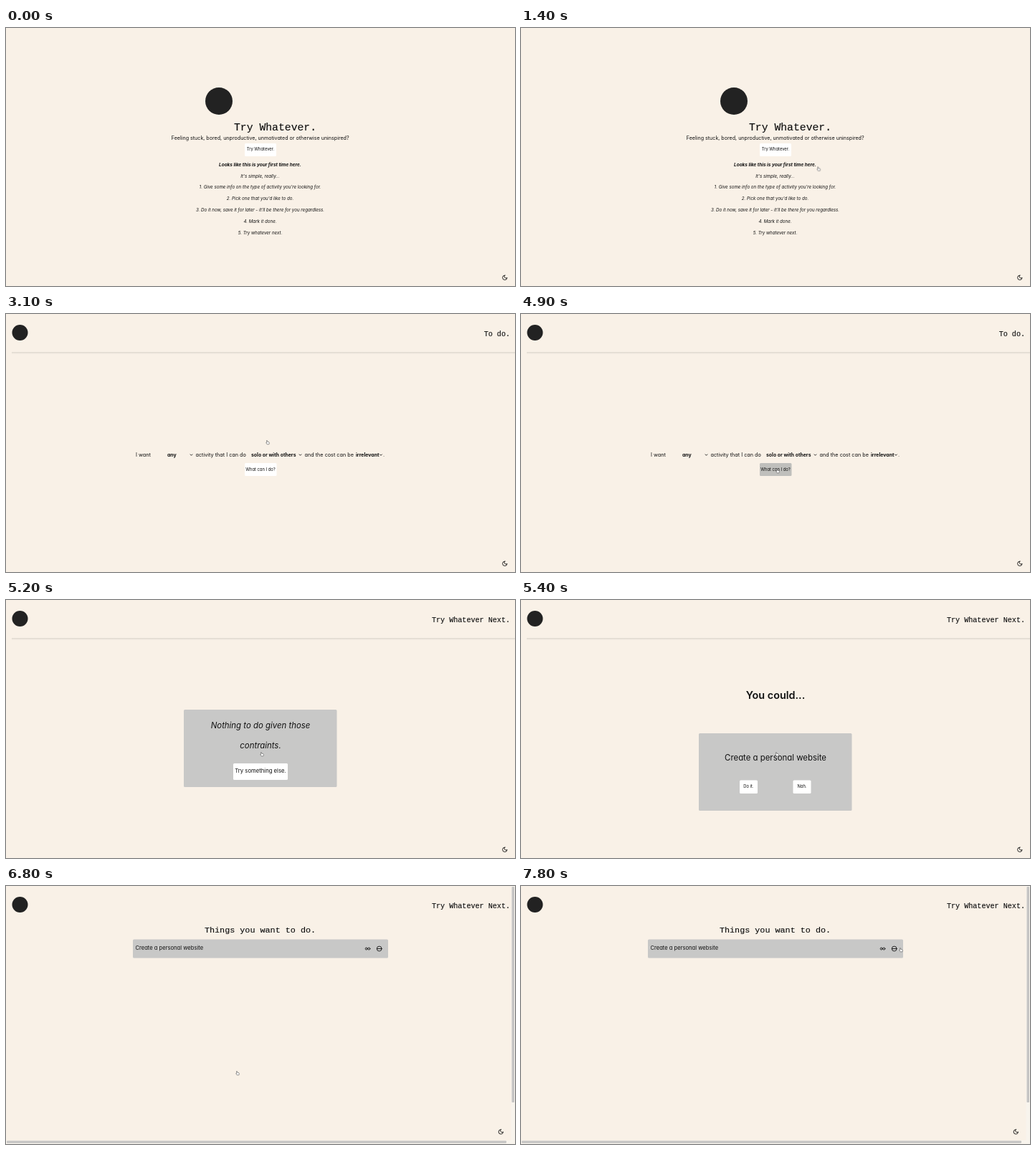
Animation, 710 px wide and 360 px high, one loop 8 s. Source, as an HTML page:

```html
<!DOCTYPE html>
<html lang="en">
<head>
<meta charset="utf-8">
<title>Try Whatever.</title>
<style>
  html, body { margin: 0; width: 100%; height: 100%; overflow: hidden; background: #f9f1e7; }
  svg { display: block; width: 710px; height: 360px; }
  text { font: 7.25px Inter, sans-serif; font-feature-settings: "cv11"; fill: #111; }
  .mid { text-anchor: middle; }
  .end { text-anchor: end; }
  .mono { font-family: "Liberation Mono", monospace; font-size: 10.1px; stroke: #111; stroke-width: .15; }
  .pick { font-size: 6.9px; font-weight: 700; }
  .guide text { font-size: 6.2px; font-style: italic; }
  .guide text:first-child { font-size: 6.45px; font-weight: 700; }
  .small { font-size: 5.8px; }
  .card-text { font-size: 11.4px; }
  .slanted { font-style: italic; }
  .bg { fill: #f9f1e7; }
  .card { fill: #c8c8c7; }
  .button { fill: #fff; }
  .icon { fill: none; stroke: #111; stroke-width: .9; stroke-linecap: round; stroke-linejoin: round; }

  /* Later pages are opaque and cover the earlier ones. */
  .page { animation: 8s step-end infinite; }
  .choose { animation-name: choose; }
  .empty { animation-name: empty; }
  .idea { animation-name: idea; }
  .list { animation-name: list; }
  @keyframes choose { 0% { visibility: hidden } 38.75%, 100% { visibility: visible } }
  @keyframes empty { 0% { visibility: hidden } 65%, 100% { visibility: visible } }
  @keyframes idea { 0% { visibility: hidden } 67.5%, 100% { visibility: visible } }
  @keyframes list { 0% { visibility: hidden } 85%, 100% { visibility: visible } }

  .hover { animation: 8s linear infinite; }
  .start-button { animation-name: hover-start; }
  .search-button { animation-name: hover-search; }
  .accept-button { animation-name: hover-accept; }
  @keyframes hover-start { 0%, 25% { fill: #fff } 28.75%, 100% { fill: #c6c4c2 } }
  @keyframes hover-search { 0%, 57.5% { fill: #fff } 61.25%, 100% { fill: #bfbfbc } }
  @keyframes hover-accept { 0%, 75% { fill: #fff } 78.75%, 100% { fill: #c8c8c7 } }

  .cursor { animation: move 8s step-end infinite, enter 8s step-end infinite; }
  .cursor path { fill: #fff; stroke: #555; stroke-width: .6; stroke-linejoin: round; }
  @keyframes enter { 0% { opacity: 0 } 8.75%, 100% { opacity: 1 } }
  @keyframes move {
    0% { transform: translate(630px, 257px) }
    8.75% { transform: translate(630px, 257px); animation-timing-function: steps(3, start) }
    12.5% { transform: translate(445px, 204px) }
    13.75% { transform: translate(445px, 204px); animation-timing-function: steps(9, start) }
    25% { transform: translate(378px, 187px); animation-timing-function: steps(4, start) }
    30% { transform: translate(365px, 179px) }
    51.25% { transform: translate(365px, 179px); animation-timing-function: steps(9, start) }
    62.5% { transform: translate(358px, 219px) }
    65% { transform: translate(357px, 215px) }
    70% { transform: translate(357px, 215px); animation-timing-function: steps(8, start) }
    80% { transform: translate(323px, 261px) }
    88.75% { transform: translate(323px, 261px); animation-timing-function: steps(8, start) }
    98.75%, 100% { transform: translate(530px, 89px) }
  }
</style>
</head>
<body>
<svg viewBox="0 0 710 360">
  <defs>
    <path id="moon" class="icon" d="M-.2-3.2a2.2 2.2 0 0 0 3.2 3.2a3.2 3.2 0 1 1-3.2-3.2Z"/>
    <path id="chevron" class="icon" d="M-1.4-.6L0 .8L1.4-.6"/>
    <linearGradient id="shade" x2="0" y2="1">
      <stop stop-color="#dcd6cd"/>
      <stop offset="1" stop-color="#f9f1e7"/>
    </linearGradient>
    <g id="header">
      <rect class="bg" width="710" height="360"/>
      <rect x="8" y="53" width="702" height="3" fill="url(#shade)"/>
      <circle cx="19.5" cy="26" r="11" fill="#222"/>
      <use href="#moon" x="696" y="348.3"/>
    </g>
  </defs>

  <g>
    <rect class="bg" width="710" height="360"/>
    <circle cx="297" cy="102" r="19" fill="#222"/>
    <text class="mono" x="318" y="143.3" style="font-size:14.75px">Try Whatever.</text>
    <text class="mid" x="354.7" y="155.5" style="font-size:7.13px">Feeling stuck, bored, unproductive, unmotivated or otherwise uninspired?</text>
    <rect class="button hover start-button" x="333" y="161" width="44" height="18" rx="1.5"/>
    <text class="mid small" x="355" y="171.2">Try Whatever.</text>
    <g class="guide mid">
      <text x="354.5" y="192.5">Looks like this is your first time here.</text>
      <text x="354.5" y="208.5">It's simple, really...</text>
      <text x="354.5" y="224.2">1. Give some info on the type of activity you're looking for.</text>
      <text x="354.5" y="240">2. Pick one that you'd like to do.</text>
      <text x="354.5" y="255.8">3. Do it now, save it for later - it'll be there for you regardless.</text>
      <text x="354.5" y="271.5">4. Mark it done.</text>
      <text x="354.5" y="287.5">5. Try whatever next.</text>
    </g>
    <use href="#moon" x="696" y="348.3"/>
  </g>

  <g class="page choose">
    <use href="#header"/>
    <text class="mono end" x="703" y="30.5">To do.</text>
    <text x="181" y="198.5">I want</text>
    <text class="pick" x="225" y="198.5">any</text>
    <use href="#chevron" x="258.5" y="196.5"/>
    <text x="264.5" y="198.5">activity that I can do</text>
    <text class="pick" x="342" y="198.5">solo or with others</text>
    <use href="#chevron" x="410.5" y="196.5"/>
    <text x="416.5" y="198.5">and the cost can be</text>
    <text class="pick" x="488" y="198.5">irrelevant</text>
    <use href="#chevron" x="523" y="196.5"/>
    <text x="526" y="198.5">.</text>
    <rect class="button hover search-button" x="333" y="208" width="44.5" height="18" rx="1.5"/>
    <text class="mid small" x="355" y="218.5">What can I do?</text>
  </g>

  <g class="page empty">
    <use href="#header"/>
    <text class="mono end" x="703" y="30.5">Try Whatever Next.</text>
    <rect class="card" x="248" y="153" width="213.5" height="108" rx="1.5"/>
    <text class="mid card-text slanted" x="355" y="179.3">Nothing to do given those</text>
    <text class="mid card-text slanted" x="355" y="207.3">contraints.</text>
    <rect class="button" x="317" y="228" width="76" height="23" rx="1.5"/>
    <text class="mid" x="355" y="241" style="font-size:7.7px">Try something else.</text>
  </g>

  <g class="page idea">
    <use href="#header"/>
    <text class="mono end" x="703" y="30.5">Try Whatever Next.</text>
    <text class="mid" x="355" y="138" style="font-size:14.4px;font-weight:600">You could...</text>
    <rect class="card" x="248" y="186" width="213.5" height="108" rx="1.5"/>
    <text class="mid card-text" x="355" y="223.5">Create a personal website</text>
    <rect class="button hover accept-button" x="305" y="251.5" width="25" height="18.5" rx="1.5"/>
    <text class="mid small" x="317.5" y="262.3">Do it.</text>
    <rect class="button" x="379.5" y="251.5" width="25" height="18.5" rx="1.5"/>
    <text class="mid small" x="392" y="262.3">Nah.</text>
  </g>

  <g class="page list">
    <rect class="bg" width="710" height="360"/>
    <circle cx="19.5" cy="26" r="11" fill="#222"/>
    <text class="mono end" x="703" y="30.5">Try Whatever Next.</text>
    <text class="mono mid" x="354.5" y="64.8" style="font-size:11.75px">Things you want to do.</text>
    <rect class="card" x="177" y="74.5" width="356" height="26" rx="1.5"/>
    <text x="180.5" y="89.3" style="font-size:7.6px">Create a personal website</text>
    <g class="icon">
      <circle cx="502.7" cy="87.5" r="1.5"/>
      <circle cx="506.3" cy="87.5" r="1.5"/>
      <circle cx="520.7" cy="87.5" r="3.4"/>
      <path d="M517.5 87.5h6.4"/>
    </g>
    <use href="#moon" x="690.5" y="343"/>
    <path d="M704.5 0V355H0V360H710V0Z" fill="#f8f4ed"/>
    <g fill="#c5c4c3">
      <rect x="705.5" y="1" width="3.5" height="301" rx="1"/>
      <rect x="1" y="355.5" width="697" height="3.2" rx="1"/>
    </g>
  </g>

  <g class="cursor">
    <path d="M-1.5-2.5Q-.7-3-.3-2.2V-.8L2-.2Q2.5 0 2.4.8L1.9 2.8H-.9L-2.3.6Q-2.2 0-1.3.5Z"/>
  </g>
</svg>
</body>
</html>
```
